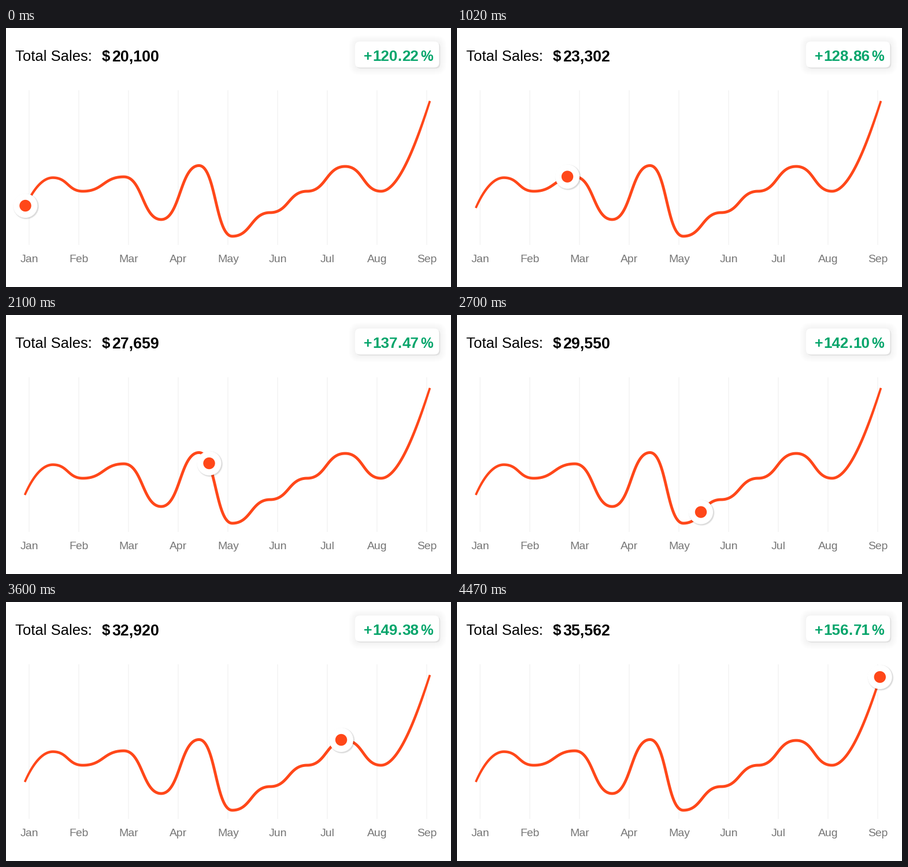
These frames come from a looping animation (770x449 px, 4500 ms). A matplotlib script:

```python
import numpy as np
import matplotlib.pyplot as plt
from matplotlib.animation import FuncAnimation
from matplotlib.patches import Circle, FancyBboxPatch

W, H, DPI = 770, 449, 64
PT = 72 / DPI  # points per pixel
FRAMES, STEP = 150, 30
ORANGE, GREEN = "#ff4719", "#05a56b"
MONTHS = "Jan Feb Mar Apr May Jun Jul Aug Sep".split()

# Peaks, troughs and plateaus of the chart, with its two sloped ends
START, END = (32.5, 312), (733.5, 126.5)
NODES = [(81, 259.5), (133, 283), (204, 258), (268.5, 332), (334, 238.5),
         (391.5, 361), (457, 320), (521, 283), (587, 240), (649, 283)]

# Key moments: time in ms, marker x, sales, growth in percent
KEYS = [(0, 33.5, 20100, 120.22), (1020, 191, 23302, 128.86),
        (1590, 287.5, 25907, 133.88), (2100, 351.5, 27659, 137.47),
        (2700, 422, 29550, 142.10), (3600, 580, 32920, 149.38),
        (4470, 731.8, 35562, 156.71)]

plt.rcParams["font.family"] = "Liberation Sans"
fig = plt.figure(figsize=(W / DPI, H / DPI), dpi=DPI, facecolor="white")
ax = fig.add_axes([0, 0, 1, 1])
ax.set_xlim(0, W)
ax.set_ylim(H, 0)
ax.axis("off")


def label(x, text, size, color="black", weight="bold", y=57, ha="left"):
    return ax.text(x, y, text, fontsize=size * PT, color=color, weight=weight,
                   ha=ha, va="baseline", zorder=10)


def panel(grow=0, shift=0, color="black", alpha=1.0):
    """Badge shape, enlarged and shifted for its shadows."""
    box = FancyBboxPatch((604 - grow + shift, 23.5 - grow + shift),
                         145.5 + 2 * grow, 45 + 2 * grow,
                         boxstyle=f"round,pad=0,rounding_size={8 + grow}",
                         fc=color, ec="none", alpha=alpha, zorder=2)
    ax.add_patch(box)


def disc(radius, color, alpha=1.0):
    return ax.add_patch(Circle((0, 0), radius, fc=color, ec="none", alpha=alpha, zorder=5))


def bezier(*points):
    p0, p1, p2, p3 = map(np.array, points)
    t = np.linspace(0, 1, 60, endpoint=False)[:, None]
    return (1 - t)**3 * p0 + 3 * (1 - t)**2 * t * p1 + 3 * (1 - t) * t**2 * p2 + t**3 * p3


def chart_points():
    parts = [bezier(START, (43, 288), (60, NODES[0][1]), NODES[0])]
    for a, b in zip(NODES, NODES[1:]):
        mid = (a[0] + b[0]) / 2
        parts.append(bezier(a, (mid, a[1]), (mid, b[1]), b))
    parts.append(bezier(NODES[-1], (680, NODES[-1][1]), (711, 196), END))
    return np.vstack(parts + [[END]])


def draw_stroke(points, arc):
    """Line that gets thinner towards both ends."""
    width = 4.9 - 1.2 * np.exp(-np.minimum(arc, arc[-1] - arc) / 60)
    tangent = np.gradient(points, axis=0)
    tangent /= np.hypot(*tangent.T)[:, None]
    side = tangent[:, ::-1] * [-1, 1] * width[:, None] / 2
    ax.fill(*np.vstack([points + side, (points - side)[::-1]]).T,
            color=ORANGE, lw=0, zorder=3)


for i, month in enumerate(MONTHS):
    x = 40 + 86 * i
    ax.plot([x, x], [108, 376], color="#f6f6f6", lw=2 * PT,
            solid_capstyle="butt", zorder=1)
    label(x + 0.5, month, 19.4, "#767676", "normal", y=406, ha="center")

# Wide glow, then a tight shadow to the lower right
for grow in range(12, 0, -1):
    panel(grow, 1, alpha=0.004)
for shift in (2, 1.2):
    panel(0, shift, alpha=0.045)
panel(color="white")

label(15.5, "Total Sales:", 25.6, weight="normal")
label(165.5, "$", 26)
sales = label(183.5, "", 26.8)
label(618.5, "+", 25, GREEN)
whole = label(634.5, "", 26, GREEN)
label(677.5, ".", 25, GREEN)
cents = label(685.5, "", 26, GREEN)
label(717.5, "%", 24.5, GREEN)

curve = chart_points()
arc = np.concatenate([[0], np.cumsum(np.hypot(*np.diff(curve, axis=0).T))])
draw_stroke(curve, arc)

shadows = [disc(21 + grow, "black", 0.05) for grow in (1.5, 0.75, 0)]
faces = [disc(21, "white"), disc(10.2, ORANGE)]

key_t, key_x, key_sales, key_rate = np.array(KEYS).T
key_arc = np.interp(key_x, curve[:, 0], arc)


def update(frame):
    t = frame * STEP
    s = np.interp(t, key_t, key_arc)
    x = np.interp(s, arc, curve[:, 0])
    y = np.interp(s, arc, curve[:, 1]) - 1.7
    for item in shadows:
        item.center = (x + 1.3, y + 1.3)
    for item in faces:
        item.center = (x, y)
    sales.set_text(f"{round(np.interp(t, key_t, key_sales)):,}")
    units, hundredths = f"{np.interp(t, key_t, key_rate):.2f}".split(".")
    whole.set_text(units)
    cents.set_text(hundredths)
    return shadows + faces + [sales, whole, cents]


anim = FuncAnimation(fig, update, frames=FRAMES, interval=STEP, repeat=True,
                     repeat_delay=0, blit=False)
plt.show()
```
